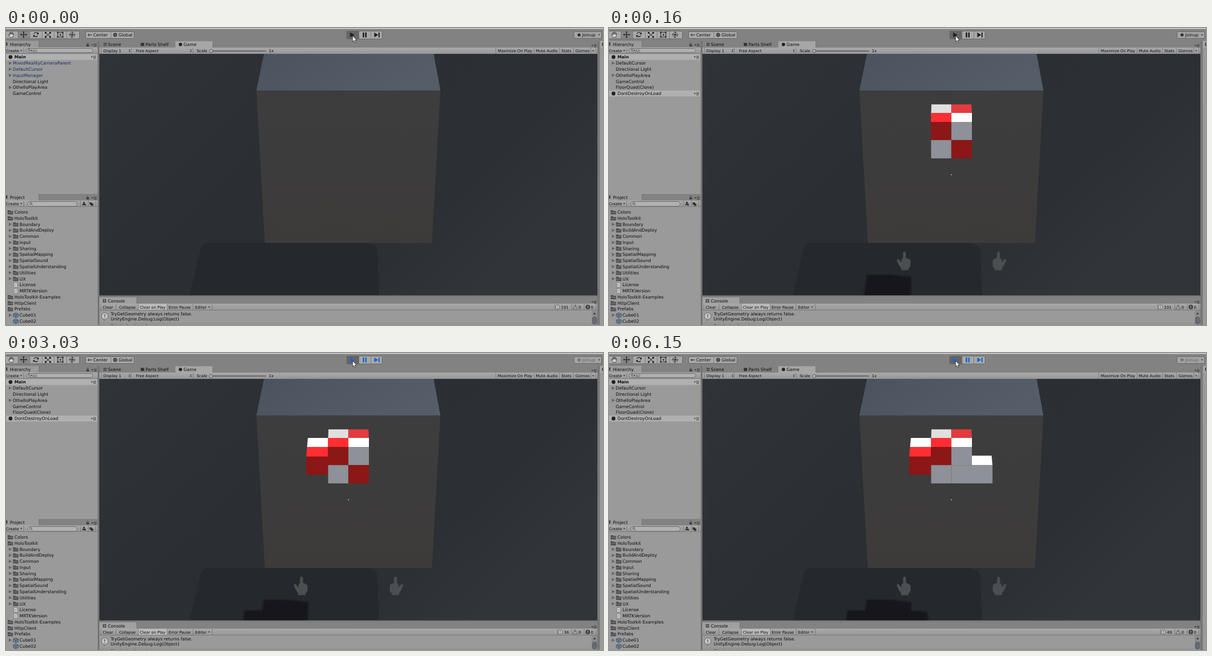
Recreate the animation shown at these times as an HTML page. Size 1061 by 528 pixels, loop 8 s.

```html
<!DOCTYPE html>
<html lang="en">
<head>
<meta charset="utf-8">
<title>Editor play mode</title>
<style>
html, body { margin: 0; width: 100%; height: 100%; overflow: hidden; background: #828282; }
svg { display: block; width: 1061px; height: 528px; }
text { font: 7.7px "DejaVu Sans", sans-serif; fill: #0c0c0c; text-rendering: geometricPrecision; white-space: pre; }
.small { font-size: 6.9px; }
.bold { font-weight: bold; font-size: 7.4px; }
.link { fill: #1b2c60; }
.off { fill: #666; }
[class^="at"] { animation: 8s step-end infinite; }
.at-edit { animation-name: edit; }
.at-run { animation-name: run; }
.at-idle { animation-name: idle; }
.at-live { animation-name: live; }
.at-n10 { animation-name: n10; }
.at-move1 { animation-name: move1; }
.at-n36 { animation-name: n36; }
.at-n49 { animation-name: n49; }
.at-start { animation-name: start; }
.at-moved { animation-name: moved; }
.at-move2 { animation-name: move2; }
.at-move3 { animation-name: move3; }
@keyframes edit { 0% { opacity: 1 } 1%, 100% { opacity: 0 } }
@keyframes run { 0% { opacity: 0 } 1%, 100% { opacity: 1 } }
@keyframes idle { 0% { opacity: 1 } 2.875%, 100% { opacity: 0 } }
@keyframes live { 0% { opacity: 0 } 2.875%, 100% { opacity: 1 } }
@keyframes n10 { 0% { opacity: 0 } 2.875% { opacity: 1 } 5%, 100% { opacity: 0 } }
@keyframes move1 { 0% { opacity: 0 } 5% { opacity: 1 } 37.875%, 100% { opacity: 0 } }
@keyframes n36 { 0% { opacity: 0 } 37.875% { opacity: 1 } 76.875%, 100% { opacity: 0 } }
@keyframes n49 { 0% { opacity: 0 } 76.875%, 100% { opacity: 1 } }
@keyframes start { 0% { opacity: 0 } 1% { opacity: 1 } 5%, 100% { opacity: 0 } }
@keyframes moved { 0% { opacity: 0 } 5%, 100% { opacity: 1 } }
@keyframes move2 { 0% { opacity: 0 } 37.875% { opacity: 1 } 74.75%, 100% { opacity: 0 } }
@keyframes move3 { 0% { opacity: 0 } 74.75%, 100% { opacity: 1 } }
</style>
</head>
<body>
<svg id="stage" viewBox="0 0 1061 528" xmlns="http://www.w3.org/2000/svg">
  <defs>
    <linearGradient id="room" x1="0" y1="0" x2="1" y2="0.5">
      <stop offset="0" stop-color="#303337"/><stop offset=".45" stop-color="#2b2e32"/>
      <stop offset=".8" stop-color="#2c2f33"/><stop offset="1" stop-color="#313438"/>
    </linearGradient>
    <linearGradient id="lid" x1="0" y1="0" x2="1" y2=".3">
      <stop offset="0" stop-color="#4b545e"/><stop offset="1" stop-color="#545d68"/>
    </linearGradient>
    <linearGradient id="face" x1="0" y1="0" x2="0" y2="1">
      <stop offset="0" stop-color="#3d3d3e"/><stop offset="1" stop-color="#3d3b3a"/>
    </linearGradient>
    <linearGradient id="bar" x1="0" y1="0" x2="0" y2="1">
      <stop offset="0" stop-color="#a9a9a9"/><stop offset="1" stop-color="#979797"/>
    </linearGradient>
    <filter id="soft" x="-20%" y="-20%" width="140%" height="140%"><feGaussianBlur stdDeviation="1.1"/></filter>
    <clipPath id="view"><rect x="166" y="46" width="885" height="429.5"/></clipPath>
  </defs>
</svg>
<script>
const INK = '#222', EDGE = '#5c5c5c', PANEL = '#9a9a9a', DOCK = '#828282';
const RED = '#ff2e32', DARK_RED = '#8b1717', GREY = '#8f9198', WHITE = '#fff';

const rect = (x, y, w, h, fill, extra = '') =>
  `<rect x="${x}" y="${y}" width="${w}" height="${h}" fill="${fill}" ${extra}/>`;
const box = (x, y, w, h, fill, r = 2) =>
  rect(x + .5, y + .5, w - 1, h - 1, fill, `rx="${r}" stroke="${EDGE}" stroke-width=".8"`);
const poly = (points, fill) => `<polygon points="${points}" fill="${fill}"/>`;
const path = (d, fill = 'none', stroke = 'none', width = 1) =>
  `<path d="${d}" fill="${fill}" stroke="${stroke}" stroke-width="${width}"/>`;
const disc = (x, y, r, fill, extra = '') => `<circle cx="${x}" cy="${y}" r="${r}" fill="${fill}" ${extra}/>`;
const text = (x, mid, s, cls = '') => `<text x="${x}" y="${mid + 2.7}" class="${cls}">${s}</text>`;
const small = (x, mid, s) => text(x, mid - .2, s, 'small');
const group = (name, ...parts) => `<g class="at-${name}">${parts.join('')}</g>`;
const down = (x, y) => poly(`${x - 1.5},${y - 1} ${x + 1.5},${y - 1} ${x},${y + 1.2}`, INK);
const fold = y => poly(`5,${y - 3} 10.5,${y} 5,${y + 3}`, '#656565');
const seps = (y, h, ...xs) => xs.map(x => rect(x, y, .8, h, '#757575')).join('');
const menu = (x, y) => down(x, y) + [-1.5, .5, 2.5].map(d => rect(x + 2.5, y + d - .5, 5, .8, '#333')).join('');
const lock = (x, y) => rect(x - 2, y, 4.5, 3, '#333') + path(`M${x - 1} ${y}v-2q1.2-1.5 2.5 0v1`, 'none', '#333', .8);
const lens = (x, y) => disc(x, y, 1.8, 'none', 'stroke="#444" stroke-width=".8"') + path(`M${x + 1.3} ${y + 1.3}l2 2`, 'none', '#444', .9);
const folder = (x, y) =>
  path(`M${x} ${y - 3.5}h4l1 1.3h4.5v6h-9.5z`, '#4c4c4c') + rect(x + .7, y - .8, 8, 2.8, '#666');
const file = (x, y) =>
  path(`M${x} ${y - 4}h4.5l2 2v6h-6.5z`, '#d0d0d0', '#666', .6) + path(`M${x + 1.3} ${y - 1}h3.8m-3.8 2h3.8`, 'none', '#777', .6);
const prefab = (x, y) =>
  path(`M${x} ${y - 2}l4.5-2 4.5 2v4.5l-4.5 2-4.5-2z`, '#6c8299', '#33465a', .7) +
  path(`M${x} ${y - 2}l4.5 2 4.5-2m-4.5 2v4.5`, 'none', '#33465a', .7);

function toolbar() {
  const tips = poly('31.2,5.7 29.4,8 33,8', INK) + poly('31.2,18 29.4,15.6 33,15.6', INK) +
    poly('25,11.8 27.3,10 27.3,13.6', INK) + poly('37.5,11.8 35.2,10 35.2,13.6', INK);
  const play = (fill, cls) =>
    poly('611.5,8 619.5,12.3 611.5,16.6', fill) +
    rect(634, 8, 2.6, 8.6, fill) + rect(638.3, 8, 2.6, 8.6, fill) +
    poly('654.5,8 661.5,12.3 654.5,16.6', fill) + rect(662, 8, 2, 8.6, fill) +
    text(1024, 12.2, 'Joinup', cls) + disc(1018.5, 12.2, 2.8, cls ? '#747474' : '#333') + down(1054, 12.2);
  return rect(0, 0, 1061, 1.6, '#d3d3d3') +
    box(-4, 5, 135, 14.5, '#a8a8a8') + rect(21, 5.5, 21, 13.5, '#868686') + seps(5.5, 13.5, 21, 42, 64, 85, 107) +
    path('M7 16.5l-3-4.5 1-.7 2 1.6-.6-4.7 1.2 0 .6 3 .1-4 1.4 0 .3 4 1-3.6 1.2.3-.4 4 1.2-2 .9.5-1.7 6.1z', '#d4d4d4', INK, .7) +
    path('M26.5 11.8h9.5m-4.8-4.8v9.6', 'none', INK, 1.2) + tips +
    path('M49.5 10q3.5-4 7.3-.5m-.5 4.5q-3.5 3.6-7-.5', 'none', INK, 1.3) +
    poly('58,7.5 58,11.5 54.3,11', INK) + poly('48.3,16.5 48.3,12.5 52,13', INK) +
    path('M70 8l9 8m0-8l-9 8', 'none', INK, 1) +
    [[69, 7], [77, 7], [69, 14.5], [77, 14.5]].map(p => rect(...p, 3, 3, INK)).join('') +
    path('M92 8h9v8h-9z', 'none', INK, 1) +
    [[90.7, 6.7], [99.7, 6.7], [90.7, 14.7], [99.7, 14.7], [95.5, 11]].map(p => rect(...p, 2.4, 2.4, INK)).join('') +
    disc(117.5, 12, 4.2, 'none', `stroke="${INK}" stroke-width=".9" stroke-dasharray="4.5 2"`) +
    path('M111.5 12h12m-6-6v12', 'none', INK, .9) + disc(117.5, 12, 1.5, INK) +
    box(141, 6, 87, 13, '#a9a9a9') + seps(6.5, 12, 186) +
    path('M146 12.3h7m-5-2.5l-2.5 2.5 2.5 2.5', 'none', INK, 1) + text(155, 12.2, 'Center') +
    disc(194, 12.2, 3.2, '#555', 'stroke="#222" stroke-width=".7"') + text(200, 12.2, 'Global') +
    box(605, 5, 64, 15, '#a7a7a7') + rect(605.5, 5.5, 21.5, 14, '#656565') + seps(5.5, 14, 627, 648) +
    box(1009, 6, 50, 13, '#a3a3a3') +
    group('idle', play('#202020', '')) + group('live', play('#1968cf', 'off'));
}

function panelHead(y, title) {
  return rect(0, y, 163, 12, DOCK) + rect(0, y, 58, 12, PANEL) + seps(y, 12, 58) +
    text(7, y + 6, title) + rect(0, y + 2.5, 2.5, 6, '#444') + lock(145, y + 6.5) + menu(153.5, y + 7) +
    rect(0, y + 11.5, 163, 11, 'url(#bar)') + small(0, y + 17.3, 'Create') + down(27, y + 17) +
    seps(y + 12, 10, 31) + rect(0, y + 22.3, 163, .7, '#747474');
}

function hierarchy() {
  const mid = i => 51.6 + i * 10.82;
  const scene = (i, name, cls) => rect(0, mid(i) - 5.4, 162, 10.6, '#b0b0b0') + disc(8, mid(i), 3.4, '#222') +
    text(15, mid(i), name, cls) + menu(152.5, mid(i));
  const rows = list => list.map(([name, open, cls = ''], i) =>
    (open ? fold(mid(i + 1)) : '') + text(12, mid(i + 1), name, cls)).join('');
  return rect(0, 46, 163, 249, PANEL) + panelHead(23, 'Hierarchy') +
    box(35, 36, 120, 8, '#b1b1b1', 4) + lens(41, 39.3) + down(45.5, 40) +
    `<g opacity=".55">${small(47, 40.2, 'All')}</g>` + scene(0, 'Main', 'bold') +
    group('edit', rows([['MixedRealityCameraParent', 1, 'link'], ['DefaultCursor', 1, 'link'], ['InputManager', 1, 'link'],
      ['Directional Light'], ['OthelloPlayArea', 1], ['GameControl']])) +
    group('run', rows([['DefaultCursor', 1], ['Directional Light'], ['OthelloPlayArea', 1],
      ['GameControl'], ['FloorQuad(Clone)']]), scene(6, 'DontDestroyOnLoad', ''));
}

function project() {
  const mid = i => 327.4 + i * 10.77;
  const names = ['Colors', 'HoloToolkit', 'Boundary', 'BuildAndDeploy', 'Common', 'Input', 'Sharing', 'SpatialMapping',
    'SpatialSound', 'SpatialUnderstanding', 'Utilities', 'UX', 'License', 'MRTKVersion',
    'HoloToolkit-Examples', 'HttpClient', 'Prefabs', 'Cube01', 'Cube02'];
  const rows = names.map((name, i) => {
    const y = mid(i), top = i < 2 || (i > 13 && i < 17);
    const icon = top ? folder(3, y) : i < 12 ? fold(y) + folder(12.5, y) : i < 14 ? file(14, y) : prefab(13, y);
    return icon + (i === 17 ? fold(y) : '') + text(top ? 15 : 24, y, name);
  });
  return rect(0, 318, 163, 210, PANEL) + panelHead(295, 'Project') +
    box(38, 308, 89, 9.5, '#b1b1b1', 4.5) + lens(44, 312) + seps(307, 11, 132, 146, 159) +
    poly('137.5,311 140,315 135,315', '#333') + disc(138.5, 310.5, 1.7, '#333') + rect(139, 312.5, 3, 3, '#333') +
    path('M148.5 310h3.5l4 4-3 3-4.5-4z', '#333') + rows.join('');
}

function cubes() {
  const back = poly('573,135.7 608.5,135.7 608.5,151 572.5,151', '#dfdfde') +
    poly('608.5,135.7 644,135.7 645,151 608.5,151', '#e23b3f');
  const left = poly('536.5,151 572.5,151 572.5,167 535,167', WHITE);
  const low = rect(572.5, 199.3, 36, 32.5, GREY);
  const base = back + rect(572.2, 151, 36.3, 16, RED) + rect(608.5, 151, 36.5, 16, WHITE) +
    rect(572, 167, 36.5, 32.3, DARK_RED) + rect(608.5, 167, 36.5, 32.3, GREY) + low;
  const corner = rect(608.5, 199.3, 36.5, 32.5, DARK_RED);
  const falling = left + poly('535,167 572,167 572,184 533.5,184', RED) +
    rect(533.5, 184, 38.5, 32.5, DARK_RED);
  return group('start', base, corner) +
    group('move1', back, left, rect(572, 151, 73, 16, WHITE), rect(535, 167, 110, 32.3, GREY), low, corner) +
    group('move2', falling, base, corner) +
    group('move3', falling, base, rect(608.5, 199.3, 73, 32.5, GREY),
      poly('645,182.5 680,182.5 681.5,199.3 645,199.3', WHITE));
}

function game() {
  const hand = path('M522.5 400q2.7-5.5 5.3 0v9l2 .3 1 1 1.8 0 1 1.2q2 0 2.4 2.6v7q-.5 4.5-4 6.5v3h-13v-3.5q-5-6-7.5-14 .5-3.5 4-1.5l3.5 4.5 1-.7v-4.5l2.5-1.5z', '#4c4f51');
  const shadow = points => `<g filter="url(#soft)">${poly(points, '#14191e')}</g>`;
  return rect(166, 46, 885, 430, 'url(#room)') + '<g clip-path="url(#view)">' +
    path('M326 476l20-84q3-10 14-10h276q24 1 24 17l3 77z', '#25282c') +
    poly('458.5,46 760,46 772,111 445,111', 'url(#lid)') +
    poly('445,111 772,111 757,382 460,382', 'url(#face)') +
    group('run',
      shadow('458,439 500,439 537,443 536,480 453,480'),
      group('moved', shadow('424,458 460,458 460,480 421,480')),
      group('move3', shadow('530,458 565,460 568,480 530,480')),
      hand, `<g transform="matrix(-1 0 0 1 1217.5 0)">${hand}</g>`,
      cubes(), rect(607.7, 260.3, 1.6, 1.2, WHITE)) + '</g>';
}

function gameHead() {
  const updown = x => poly(`${x - 1.3},39.8 ${x + 1.3},39.8 ${x},37.8`, INK) + poly(`${x - 1.3},41 ${x + 1.3},41 ${x},43`, INK);
  return rect(166, 23, 885, 12, DOCK) + rect(300, 23.5, 67, 12, '#a6a6a6') + seps(23.5, 12, 300, 367) +
    path('M173 27.5h6m-6 3h6m-4.5-4.5v6.5m3-6.5v6.5', 'none', '#333', .8) + text(181, 29.2, 'Scene') +
    rect(239.5, 26.5, 6, 5.5, '#333') + text(248, 29.2, 'Parts Shelf') +
    disc(310, 29.2, 3, '#222') + text(315.5, 29.2, 'Game') + menu(1042, 31) +
    rect(166, 34.8, 885, 11, 'url(#bar)') + small(173, 40.5, 'Display 1') + small(231, 40.5, 'Free Aspect') +
    updown(219.5) + updown(328.5) +
    small(339, 40.8, 'Scale') + rect(366, 40.3, 96, 1.2, '#444') + disc(364.5, 41, 2.9, '#b5b5b5', 'stroke="#444" stroke-width=".8"') +
    small(467, 40.8, '1x') + small(874, 40.5, 'Maximize On Play') + small(941.5, 40.5, 'Mute Audio') +
    small(987, 40.5, 'Stats') + small(1012, 40.5, 'Gizmos') + down(1043.5, 40.5) +
    seps(35, 10.5, 169, 222, 332, 870, 938, 983, 1008, 1039, 1048);
}

function consolePanel() {
  const bubble = (x, y, r, fill, mark) => disc(x, y, r, fill, 'stroke="#555" stroke-width=".8"') +
    rect(x - r / 8, y - r * .55, r / 4, r * .65, mark) + rect(x - r / 8, y + r * .3, r / 4, r / 4, mark);
  const count = (n, x) => seps(490.5, 10.5, x - 9) + bubble(x - 4, 496, 3.7, '#c8c8c8', '#444') + small(x + 2.5, 496.3, n);
  return rect(166, 475.5, 885, 14.5, DOCK) + rect(166, 475.5, 885, 1, '#686868') +
    rect(166, 479, 66, 11, '#a0a0a0') + seps(479, 11, 232) + rect(172, 482, 6, 6, '#444') +
    rect(173, 483.5, 4, .8, '#bbb') + rect(173, 485.5, 4, .8, '#bbb') + text(181, 485, 'Console') + menu(1042, 487) +
    rect(166, 490, 885, 11.5, 'url(#bar)') + rect(235, 490.3, 51, 11, '#bababa') +
    [[172, 'Clear'], [201, 'Collapse'], [238, 'Clear on Play'], [289, 'Error Pause'], [336, 'Editor']]
      .map(([x, s]) => small(x, 496.3, s)).join('') + down(361, 496) +
    seps(490.3, 11, 168, 195, 235, 286, 332, 366, 1005, 1027, 1048) +
    group('idle', count('101', 984)) + group('n10', count('10', 989)) + group('move1', count('23', 989)) +
    group('n36', count('36', 989)) + group('n49', count('49', 989)) +
    path('M1011.5 491.8l4 7.5h-8z', '#b5b5b5', '#444', .8) + rect(1011.1, 494.5, .9, 2.5, '#333') + small(1017.5, 496.3, '0') +
    bubble(1034, 496, 3.9, '#3f3f3f', '#ddd') + small(1039.5, 496.3, '0') +
    rect(166, 501.5, 885, 26.5, PANEL) + rect(166, 501, 885, .7, '#6c6c6c') + rect(166, 523.8, 875, 4.2, '#949494') +
    path('M173 517l1.5 4 3-4z', '#c5c5c5', '#555', .7) + bubble(175.5, 512.3, 5.8, '#c5c5c5', '#555') +
    text(186, 508.6, 'TryGetGeometry always returns false.') + text(186, 517.5, 'UnityEngine.Debug:Log(Object)') +
    text(186, 530, 'Displaying board') +
    rect(1041, 501.7, 10, 26.3, '#8c8c8c') + poly('1046,505.8 1048.3,509 1043.7,509', '#333') +
    box(1041.5, 513, 9, 14, '#626b76', 4);
}

const frame = rect(0, 0, 1061, 528, DOCK) + rect(163, 23, 3, 505, '#737373') +
  rect(1051, 23, 4, 505, '#777') + rect(1055, 23, 6, 505, PANEL) + rect(1055, 23, 6, 12, '#a6a6a6') +
  rect(1059.5, 26, 1.5, 6, '#333') + seps(23, 505, 1054.5);
const cursor = path('M616 14v10.2l2.3-2 1.7 3.7 1.7-.8-1.7-3.6h3.2z', WHITE, '#111', .7);

document.getElementById('stage').insertAdjacentHTML('beforeend',
  frame + toolbar() + hierarchy() + project() + game() + gameHead() + consolePanel() + cursor);
</script>
</body>
</html>
```
